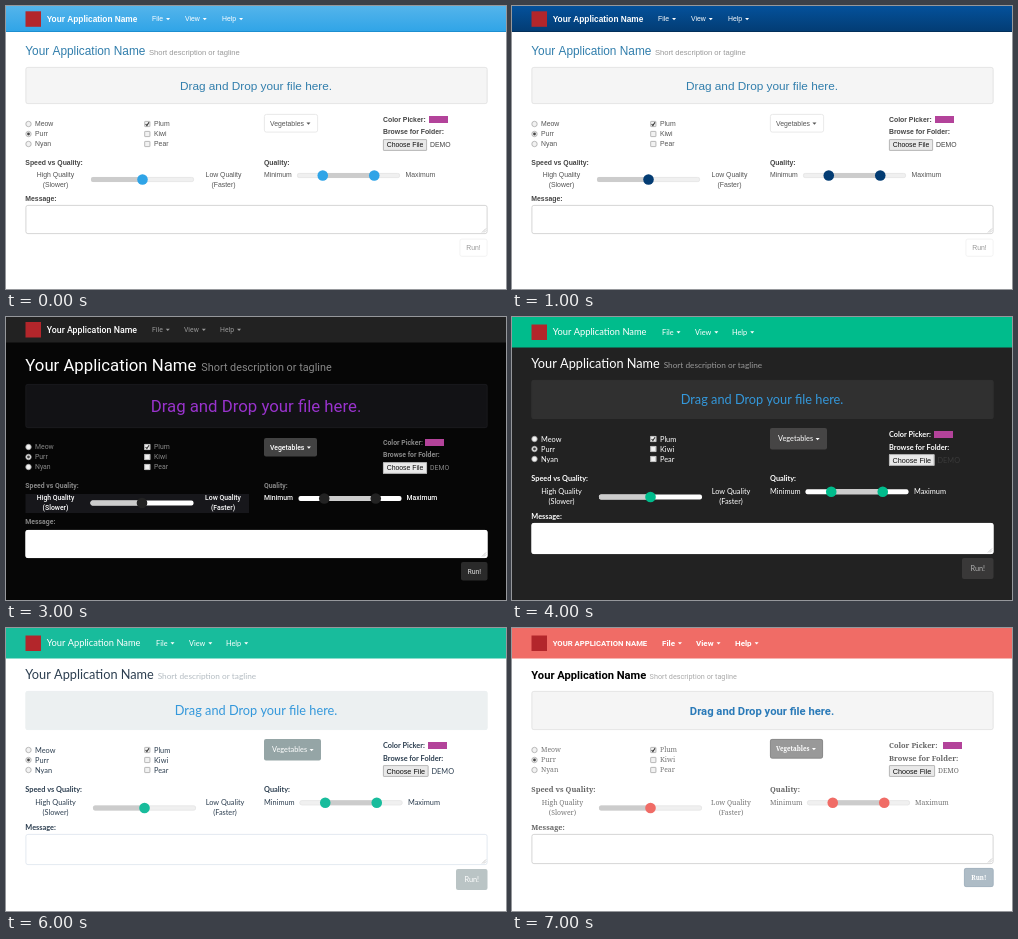
Write an HTML page with a canvas that moves like this. It is 500 px wide and 283 px high and loops after 8 s.

```html
<!DOCTYPE html>
<html lang="en">
<head>
<meta charset="utf-8">
<title>Theme switcher</title>
<style>
html, body { margin: 0; width: 100%; height: 100%; overflow: hidden; background: #fff; }
canvas { display: block; width: 500px; height: 283px; }
</style>
</head>
<body>
<canvas id="stage" width="500" height="283"></canvas>
<script>
const ctx = document.getElementById('stage').getContext('2d');
const HOLD = 1000;
const LEFT = 19.3;

const ARIAL = '"Liberation Sans", Arial, sans-serif';
const HAN = '"Noto Sans CJK JP", "Noto Sans CJK SC", "Noto Sans CJK", sans-serif';
const ROBOTO = 'Roboto, sans-serif';
const LATO = 'Lato, sans-serif';
const SERIF = '"Noto Serif", serif';

// Vertical positions are text centres; pairs are [top, bottom].
const compact = { nav: 26, navText: 12.8, head: 45, well: [61, 98], row: 118, speed: 156.5,
  side: 169, line: 9.9, track: 173.5, msg: 192.6, area: [199, 228] };
const roomy = { nav: 30.5, navText: 15, head: 46, well: [63, 102], row: 122, speed: 161.5,
  side: 174.3, line: 10.4, track: 180, msg: 199, area: [206, 237] };
const tall = { nav: 25.5, navText: 12.5, head: 47.5, well: [67, 111], row: 130, speed: 169,
  side: 181, line: 9.8, track: 186, msg: 204.5, area: [213, 241] };

const base = {
  ...compact, font: ARIAL, headFont: null, size: 6.86, headSize: 11.85, smallSize: 7.65, dragSize: 11.8,
  brandSize: 8.8, brandWeight: 400, menuWeight: 400, headWeight: 400, btnWeight: 400, sideWeight: 400,
  menu: [146, 179, 216], bg: '#fff', navFill: ['#222', '#222'], brand: '#fff', link: '#fff',
  ink: '#333', label: '#333', sideInk: null, title: '#333', small: '#999', drag: '#2d6f9c',
  wellFill: '#f5f5f5', wellLine: '#e1e1e1', radius: 2, knob: '#222', rest: '#f0f0f0', areaLine: '#ccc',
  btn: { x: 258, y: 108, w: 54, h: 17, pad: 6, fill: '#fff', line: '#ccc', ink: '#333' },
  run: { x: 454, y: 230, w: 28, h: 16.5, fill: '#fff', line: '#ddd', ink: '#888' },
  swatch: 423, fileInk: '#444', fileW: 44, lowX: 217.5, highX: 49.5, t1: 85, t2: 291, maxX: 399.5
};

const sky = {
  ...base, navFill: ['#54b4eb', '#2fa4e7'], navLine: '#1d8fd0', brandSize: 8.3, brandWeight: 700,
  ink: '#555', label: '#444', title: '#317eac', drag: '#317eac', knob: '#2fa4e7',
  btn: { ...base.btn, h: 18.5, line: '#e4e4e4', ink: '#555' },
  run: { x: 453.5, y: 232.7, w: 28, h: 18, fill: '#fff', line: '#f0f0f0', ink: '#999' }
};

const navy = { ...sky, navFill: ['#04519b', '#033c73'], navLine: '#022f5a', knob: '#033c73' };

const azure = {
  ...base, ...roomy, nav: 25.5, navText: 13, font: HAN, size: 6.55, headSize: 11.1, smallSize: 6.8, dragSize: 11,
  brandSize: 8, brandWeight: 700, menuWeight: 700, btnWeight: 700, menu: [144, 177, 212],
  navFill: ['#2482e8', '#2482e8'], drag: '#9954bb', wellFill: '#f4f4f4', radius: 0, knob: '#2482e8',
  btn: { x: 258, y: 111, w: 57.5, h: 21.5, pad: 8.5, fill: '#222', ink: '#fff' },
  run: { x: 448, y: 242, w: 33.5, h: 21, fill: '#727272', ink: '#fff' },
  area: [206, 238], swatch: 421, fileW: 46, lowX: 216, t2: 292.5, maxX: 400.5
};

const night = {
  ...base, ...tall, font: ROBOTO, headSize: 16.75, smallSize: 10.83, dragSize: 16.8,
  brandWeight: 500, btnWeight: 500, sideWeight: 500, menu: [146, 178, 214], bg: '#060606', link: '#999',
  ink: '#888', label: '#888', sideInk: '#fff', title: '#fff', small: '#888', drag: '#9933cc',
  wellFill: '#121215', wellLine: '#1b1b1f', rest: '#fff', areaLine: '#fff', panel: '#17171b',
  btn: { x: 258, y: 121, w: 53, h: 18.5, pad: 6, fill: '#424242', ink: '#fff' },
  run: { x: 455, y: 245, w: 26.5, h: 18.5, fill: '#2a2a2a', ink: '#bbb' },
  swatch: 419, fileInk: '#888', lowX: 217, t1: 84.5, t2: 292.5, maxX: 400.5
};

const emerald = {
  ...base, ...roomy, font: LATO, size: 7.35, headSize: 12.74, smallSize: 8.28, dragSize: 12.74,
  brandSize: 9.31, menu: [150, 183, 220], bg: '#222', navFill: ['#00bc8c', '#00bc8c'],
  ink: '#fff', label: '#fff', title: '#fff', drag: '#3498db',
  wellFill: '#303030', wellLine: '#303030', knob: '#00bc8c', rest: '#fff', areaLine: '#fff',
  btn: { x: 258, y: 111, w: 57, h: 21.5, pad: 8, fill: '#464545', ink: '#fff' },
  run: { x: 450, y: 241, w: 31.5, h: 21, fill: '#393838', ink: '#b0b0b0' },
  swatch: 422, fileInk: '#3a3a3a', fileW: 45.5, lowX: 219, t1: 87, t2: 293.5, maxX: 402
};

const plain = { ...base, brand: '#9d9d9d', link: '#9d9d9d' };

const mint = {
  ...emerald, bg: '#fff', navFill: ['#18bc9c', '#18bc9c'], ink: '#2c3e50', label: '#2c3e50',
  title: '#2c3e50', small: '#b4bcc2', wellFill: '#ecf0f1', wellLine: '#ecf0f1', knob: '#18bc9c',
  rest: '#f0f0f0', areaLine: '#dce4ec', fileInk: '#2c3e50',
  btn: { ...emerald.btn, fill: '#95a5a6' },
  run: { ...emerald.run, fill: '#bac4c5', ink: '#fff' }
};

const coral = {
  ...base, ...roomy, head: 46.8, font: SERIF, headFont: ROBOTO, size: 6.85, labelSize: 7.4, btnSize: 6.2,
  headSize: 11.15, smallSize: 7.25, dragSize: 11.25, headWeight: 700, brandSize: 7.7, brandWeight: 700,
  menuSize: 8, menuWeight: 700, btnWeight: 700, upper: true, menu: [150, 184, 223],
  navFill: ['#f06c66', '#f06c66'], ink: '#777', label: '#666', title: '#000', small: '#aaa', drag: '#2a7ab8',
  knob: '#f06c66', area: [206, 236],
  btn: { x: 258, y: 111, w: 53, h: 19.5, pad: 6, fill: '#999', line: '#888', ink: '#fff' },
  run: { x: 452, y: 240, w: 29.5, h: 19, fill: '#aebcc6', line: '#a2b2be', ink: '#fff' },
  swatch: 431, fileInk: '#666', fileW: 46, lowX: 219, highX: 50.5, t1: 87, t2: 295, maxX: 403
};

const themes = [sky, navy, azure, night, emerald, plain, mint, coral];

function text(str, x, midY, size, color, font, weight = 400, align = 'left') {
  ctx.font = `${weight} ${size}px ${font}`;
  ctx.fillStyle = color;
  ctx.textAlign = align;
  ctx.fillText(str, x, midY + size * 0.36);
  return ctx.measureText(str).width;
}

function box(x, y, w, h, fill, line, radius = 0) {
  ctx.beginPath();
  ctx.roundRect(x, y, w, h, radius);
  ctx.fillStyle = fill;
  ctx.fill();
  if (!line) return;
  ctx.beginPath();
  ctx.roundRect(x + 0.4, y + 0.4, w - 0.8, h - 0.8, radius);
  ctx.strokeStyle = line;
  ctx.lineWidth = 0.8;
  ctx.stroke();
}

function disc(x, y, r, fill, line) {
  ctx.beginPath();
  ctx.arc(x, y, r, 0, Math.PI * 2);
  ctx.fillStyle = fill;
  ctx.fill();
  if (!line) return;
  ctx.strokeStyle = line;
  ctx.lineWidth = 0.8;
  ctx.stroke();
}

function stroke(points, color, width) {
  ctx.beginPath();
  points.forEach(([x, y]) => ctx.lineTo(x, y));
  ctx.strokeStyle = color;
  ctx.lineWidth = width;
  ctx.stroke();
}

function caret(x, y, color) {
  ctx.beginPath();
  ctx.moveTo(x, y - 1);
  ctx.lineTo(x + 4, y - 1);
  ctx.lineTo(x + 2, y + 1.2);
  ctx.fillStyle = color;
  ctx.fill();
}

function slider(t, x, y, from, to, knobs) {
  const w = 103;
  box(x, y - 2.5, w, 5, t.rest, t.rest === '#fff' ? null : '#e6e6e6', 2);
  box(x + w * from, y - 2.5, w * (to - from), 5, '#ccc', null, 2);
  knobs.forEach(k => disc(x + w * k, y, 5.3, t.knob));
}

function drawNav(t) {
  const shade = ctx.createLinearGradient(0, 0, 0, t.nav);
  t.navFill.forEach((color, i) => shade.addColorStop(i, color));
  box(0, 0, 500, t.nav, shade);
  if (t.navLine) box(0, t.nav - 1, 500, 1, t.navLine);
  box(19.5, t.navText - 7.5, 15.5, 15.5, '#b3262b');
  const name = 'Your Application Name';
  const font = t.headFont || t.font;
  text(t.upper ? name.toUpperCase() : name, 40.7, t.navText, t.brandSize, t.brand, font, t.brandWeight);
  ['File', 'View', 'Help'].forEach((item, i) => {
    const w = text(item, t.menu[i], t.navText, t.menuSize || t.size, t.link, font, t.menuWeight);
    caret(t.menu[i] + w + 3, t.navText + 0.3, t.link);
  });
}

function drawHeader(t) {
  const font = t.headFont || t.font;
  const [top, bottom] = t.well;
  const w = text('Your Application Name', LEFT, t.head, t.headSize, t.title, font, t.headWeight);
  text('Short description or tagline', LEFT + w + t.headSize * 0.3,
    t.head + (t.headSize - t.smallSize) * 0.36, t.smallSize, t.small, font);
  box(19.5, top, 462, bottom - top, t.wellFill, t.wellLine, t.radius);
  text('Drag and Drop your file here.', 250, (top + bottom) / 2 + 0.4, t.dragSize, t.drag, font, t.headWeight, 'center');
}

function drawChoices(t) {
  ['Meow', 'Purr', 'Nyan'].forEach((item, i) => {
    const y = t.row + i * 10;
    disc(22.5, y, 2.7, '#f2f2f2', '#aaa');
    if (i === 1) disc(22.5, y, 1.4, '#444');
    text(item, 29, y, t.size, t.ink, t.font);
  });
  ['Plum', 'Kiwi', 'Pear'].forEach((item, i) => {
    const y = t.row + i * 10;
    box(138.3, y - 3, 6, 6, '#f2f2f2', '#aaa', 0.5);
    if (!i) stroke([[139.6, y], [140.9, y + 1.5], [143, y - 1.7]], '#333', 1.1);
    text(item, 148, y, t.size, t.ink, t.font);
  });
}

function drawButtons(t) {
  const { btn, run } = t;
  const size = t.btnSize || t.size;
  box(btn.x, btn.y, btn.w, btn.h, btn.fill, btn.line, t.radius);
  const y = btn.y + btn.h / 2;
  const w = text('Vegetables', btn.x + btn.pad, y, size, btn.ink, t.font, t.btnWeight);
  caret(btn.x + btn.pad + w + 2.5, y + 0.3, btn.ink);
  box(run.x, run.y, run.w, run.h, run.fill, run.line, t.radius);
  text('Run!', run.x + run.w / 2, run.y + run.h / 2, size, run.ink, t.font, t.btnWeight, 'center');
}

function drawPickers(t) {
  const label = (str, y) => text(str, 377, y, t.labelSize || t.size, t.label, t.font, 700);
  label('Color Picker:', t.row - 4.5);
  box(t.swatch, t.row - 8, 19, 7, '#b3439a');
  label('Browse for Folder:', t.row + 8);
  const y = t.row + 21;
  box(377, y - 5.8, t.fileW, 11.6, '#e9e9e9', '#aaa', 0.5);
  text('Choose File', 377 + t.fileW / 2, y, t.fileW > 45 ? 7.25 : 6.86, '#111', ARIAL, 400, 'center');
  text('DEMO', 377 + t.fileW + 3, y, t.size, t.fileInk, t.font);
}

function drawRanges(t) {
  const label = (str, x) => text(str, x, t.speed, t.labelSize || t.size, t.label, t.font, 700);
  const note = (str, x, y, align) =>
    text(str, x, y, t.size, t.sideInk || t.ink, t.font, t.sideWeight, align);
  const pair = (lines, x) => lines.forEach((str, i) => note(str, x, t.side + i * t.line, 'center'));
  if (t.panel) box(19.5, 177, 223.5, 19, t.panel);
  label('Speed vs Quality:', LEFT);
  label('Quality:', 258);
  pair(['High Quality', '(Slower)'], t.highX);
  pair(['Low Quality', '(Faster)'], t.lowX);
  slider(t, t.t1, t.track, 0, 0.5, [0.5]);
  note('Minimum', 258, t.side);
  note('Maximum', t.maxX, t.side);
  slider(t, t.t2, t.side + 0.5, 0.25, 0.75, [0.25, 0.75]);
}

function drawMessage(t) {
  const [top, bottom] = t.area;
  text('Message:', LEFT, t.msg, t.labelSize || t.size, t.label, t.font, 700);
  box(19.5, top, 462, bottom - top, '#fff', t.areaLine, t.radius);
  [4, 2].forEach(d => stroke([[480 - d, bottom - 1.5], [480, bottom - 1.5 - d]], '#aaa', 0.6));
}

function draw(t) {
  box(0, 0, 500, 283, t.bg);
  [drawNav, drawHeader, drawChoices, drawButtons, drawPickers, drawRanges, drawMessage].forEach(part => part(t));
}

function tick() {
  draw(themes[Math.floor(performance.now() / HOLD) % themes.length]);
  requestAnimationFrame(tick);
}
tick();
</script>
</body>
</html>
```
